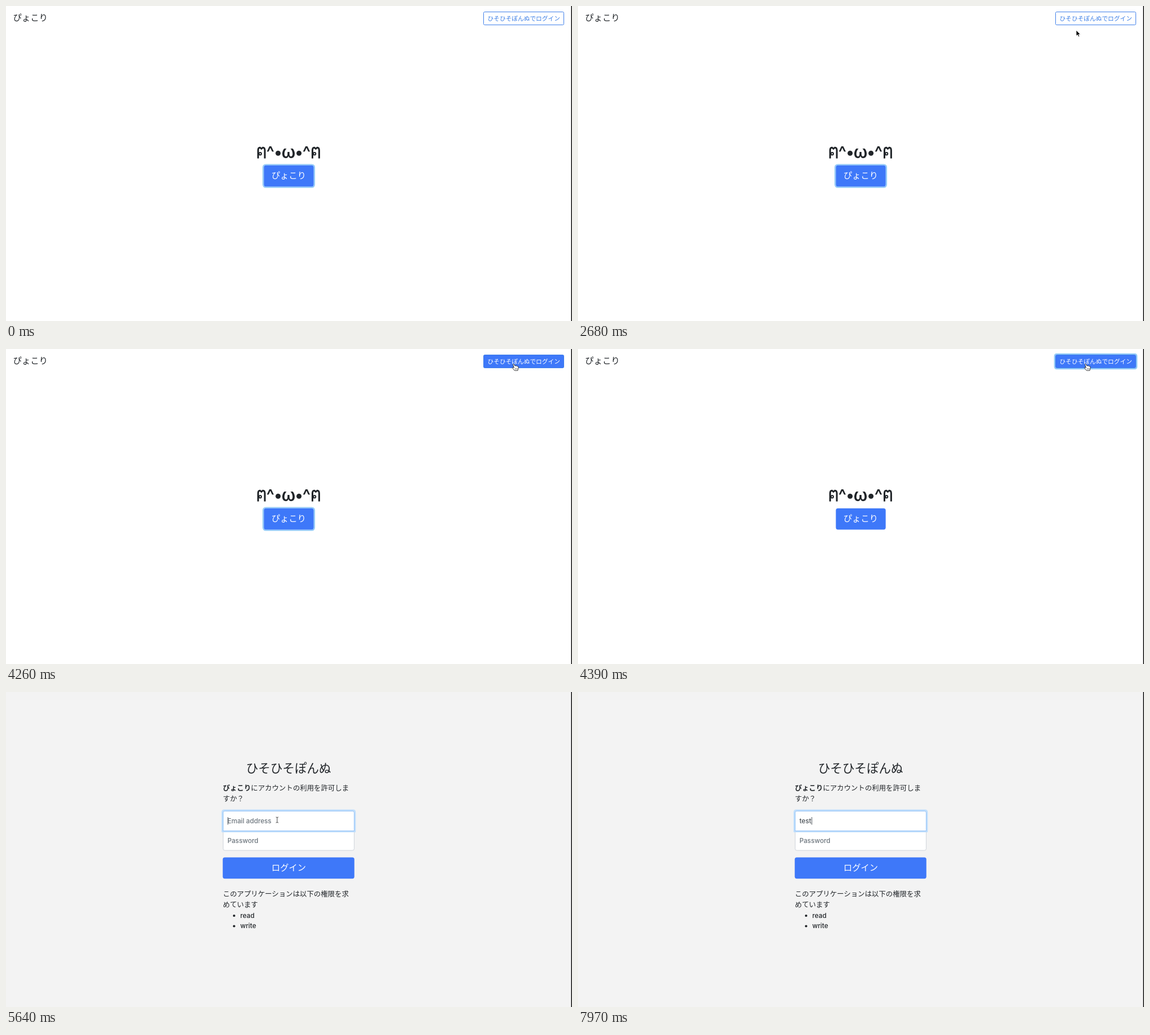
Animation, 1002 px wide and 559 px high, one loop 8 s. Source, as an HTML page:

```html
<!DOCTYPE html>
<html lang="ja">
<head>
<meta charset="utf-8">
<title>ログイン</title>
<style>
  html, body { margin: 0; height: 100%; overflow: hidden; background: #fff; }
  svg { display: block; width: 100vw; height: 100vh; }
  text { font-family: "Noto Sans CJK JP", "Noto Sans CJK", sans-serif; fill: #212529; white-space: pre; }
  .latin { font: 500 11.7px Inter, sans-serif; }
  .body { font-size: 12.4px; }
  .mid { text-anchor: middle; }
  .white { fill: #fff; }
  .hint { fill: #6c757d; }
  .typed { fill: #495057; }
  .blue { fill: #3e78f9; }
  .ring { fill: none; stroke: #93cbf8; stroke-width: 2.4; }
  .soft { stroke: #bfdefc; }
  .paw { fill: none; stroke: #212529; stroke-width: 3; }
</style>
</head>
<body>
<svg viewBox="0 0 1002 559">
  <defs>
    <g id="paw" class="paw">
      <path d="M446.3 270.5V256.5Q446.3 251.2 449.6 251.2L452.2 253.4 454.8 251.2Q458.2 251.2 458.2 256.5V270.5"/>
      <circle cx="450" cy="262.2" r="2.1" stroke-width="2"/>
    </g>
  </defs>

  <g id="home">
    <rect width="1002" height="559" fill="#fff"/>
    <text x="12.6" y="26.4" font-size="15.3">ぴょこり</text>

    <rect id="loginRing" class="ring" x="843.9" y="8.9" width="145.2" height="26.2" rx="3.5"/>
    <rect id="loginBox" x="845.5" y="10.5" width="142" height="23" rx="2" stroke="#3f7fe9"/>
    <text id="loginText" class="mid" x="916.7" y="25.8" font-size="10.7">ひそひそぽんぬでログイン</text>

    <g aria-label="ฅ^•ω•^ฅ">
      <use href="#paw"/>
      <use href="#paw" x="96.2"/>
      <circle cx="481.7" cy="261.3" r="4.5" fill="#212529"/>
      <circle cx="518.7" cy="261.3" r="4.5" fill="#212529"/>
      <text class="mid" x="468 500.2 532" y="270" style="font:600 30px Inter,sans-serif">^ω^</text>
    </g>

    <rect id="mainRing" class="ring" x="455.3" y="281.6" width="90.6" height="40" rx="4.5"/>
    <rect class="blue" x="456.5" y="282.8" width="88.2" height="37.6" rx="3.6"/>
    <text class="mid white" x="500.5" y="306.3" font-size="15.3">ぴょこり</text>
  </g>

  <g id="form">
    <rect width="1002" height="559" fill="#f3f3f3"/>
    <text class="mid" x="500.3" y="143.2" font-size="21.5">ひそひそぽんぬ</text>
    <g class="body">
      <text x="384" y="174.8"><tspan font-weight="700">ぴょこり</tspan>にアカウントの利用を許可しま</text>
      <text x="384" y="193.5">すか？</text>
      <text x="384" y="362.8">このアプリケーションは以下の権限を求</text>
      <text x="384" y="381.5">めています</text>
    </g>

    <rect x="384.4" y="211.3" width="232" height="69.8" rx="3" fill="#fff" stroke="#ced4da"/>
    <path d="M384.4 246.5H616.4" stroke="#ced4da"/>
    <g id="inputRing">
      <path class="ring soft" d="M382.8 247.7V213.5Q382.8 209.8 386.5 209.8H614.3Q618 209.8 618 213.5V247.7Z" stroke-linejoin="round"/>
      <path d="M384.4 246.4V214.3Q384.4 211.3 387.4 211.3H613.4Q616.4 211.3 616.4 214.3V246.4Z" fill="#fff" stroke="#8fc0f8"/>
    </g>
    <text id="hint" class="latin hint" x="392" y="233.2">Email address</text>
    <text id="typed" class="latin typed" x="392" y="233.2"></text>
    <rect id="caret" class="typed" y="222" width="1" height="13.5"/>
    <text class="latin hint" x="392" y="268.2">Password</text>

    <rect class="blue" x="383.7" y="293.5" width="233" height="37.7" rx="3.6"/>
    <text class="mid white" x="500.5" y="317" font-size="15.3">ログイン</text>

    <circle cx="403.8" cy="397" r="2.1" fill="#212529"/>
    <circle cx="403.8" cy="415.5" r="2.1" fill="#212529"/>
    <text class="latin" x="414.8" y="400.8">read</text>
    <text class="latin" x="414.8" y="419.3">write</text>
  </g>

  <g id="cursor">
    <path id="arrow" d="M0 0V10.2L2.4 8 4 11.6 5.8 10.8 4.2 7.4H7.4Z" fill="#000" stroke="#fff" stroke-width=".8"/>
    <g id="hand" fill="#fff" stroke="#222" stroke-width=".9" stroke-linejoin="round">
      <path d="M-2.6 1.2Q-1.8-.2-.6 .9L1 4Q2.3 3 3.3 4.1 4.6 3.5 5.3 4.7 7 4.5 7.2 6.4L6.5 10 6 12.2H.3L-3.2 8Q-3.9 6.3-2.2 6.4L-.6 7.4Z"/>
      <path d="M1.5 8.2V10.4M3.1 8.2V10.4M4.7 8.2V10.4" stroke-width=".6"/>
    </g>
    <path id="beam" d="M-2.2-5Q0-5 0-3.6 0-5 2.2-5M0-3.6V3.6M-2.2 5Q0 5 0 3.6 0 5 2.2 5" fill="none" stroke="#333" stroke-width=".9"/>
  </g>

  <rect x="1000.5" width="1.5" height="559" fill="#111"/>
</svg>
<script>
const LOOP = 8000;
const SWITCH = 4720;
const $ = id => document.getElementById(id);
const show = (id, on) => $(id).setAttribute("visibility", on ? "inherit" : "hidden");
const ramp = (t, from, to) => Math.min(1, Math.max(0, (t - from) / (to - from)));

// Pointer track: time, x, y
const track = [
  [820, 512, 294], [1330, 512, 294], [1450, 600, 378], [1560, 696, 350],
  [2020, 696, 350], [2230, 817, 158], [2380, 817, 158], [2530, 852, 82],
  [2680, 882, 43], [2750, 882, 43], [3010, 894, 32], [3140, 899, 28],
  [3210, 900, 26], [4969, 900, 26], [4970, 831, 52], [5110, 831, 52],
  [5300, 640, 150], [5450, 500, 218], [5560, 480, 227], [LOOP, 480, 227],
];
// Pointer shape from each time on
const shapes = [[0, ""], [820, "hand"], [1340, "arrow"], [2940, "hand"],
                [4970, "arrow"], [5380, "beam"], [7610, ""]];
const keystrokes = [7610, 7640, 7870, 7970];

function pointerAt(t) {
  const i = Math.max(1, track.findIndex(key => key[0] > t));
  const [t0, x0, y0] = track[i - 1], [t1, x1, y1] = track[i];
  const k = ramp(t, t0, t1);
  return [x0 + (x1 - x0) * k, y0 + (y1 - y0) * k];
}

function blend(a, b, k) {
  return `rgb(${a.map((v, i) => Math.round(v + (b[i] - v) * k))})`;
}

function draw(t) {
  const white = [255, 255, 255], blue = [62, 120, 249], link = [59, 126, 230];
  show("home", t < SWITCH);
  show("form", t >= SWITCH);

  const hover = ramp(t, 2945, 3080);
  $("loginBox").setAttribute("fill", blend(white, blue, hover));
  $("loginText").style.fill = blend(link, white, hover);
  const moved = ramp(t, 4260, 4390);
  $("loginRing").setAttribute("opacity", moved);
  $("mainRing").setAttribute("opacity", 1 - moved);

  $("inputRing").setAttribute("opacity", ramp(t, 4740, 4790));
  const count = keystrokes.filter(time => t >= time).length;
  $("typed").textContent = "test".slice(0, count);
  show("hint", t >= SWITCH && !count);
  show("caret", t >= SWITCH && (count || Math.floor((t - 4640) / 500) % 2 === 0));
  $("caret").setAttribute("x", 392.4 + (count ? $("typed").getComputedTextLength() : 0));

  const shape = shapes.filter(([time]) => t >= time).pop()[1];
  for (const id of ["arrow", "hand", "beam"]) show(id, id === shape);
  $("cursor").setAttribute("transform", `translate(${pointerAt(t)})`);
}

function tick() {
  draw(performance.now() % LOOP);
  requestAnimationFrame(tick);
}
tick();
</script>
</body>
</html>
```
